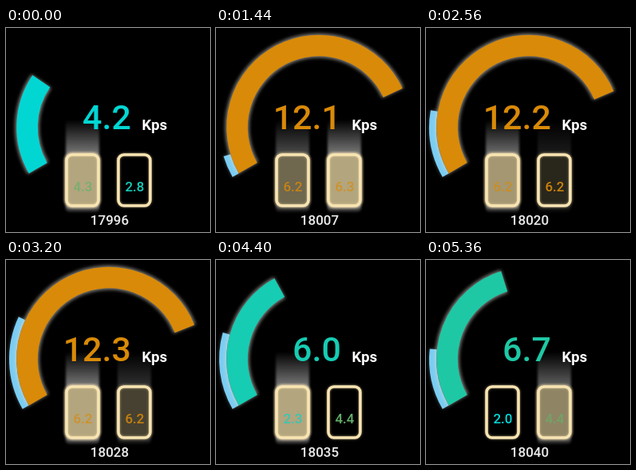
An HTML page that plays this animation: 256 px wide and 256 px high, repeating every 5440 ms.

```html
<!DOCTYPE html>
<html lang="en">
<head>
<meta charset="utf-8">
<title>Key rate gauge</title>
<style>
  html, body { margin: 0; width: 100%; height: 100%; overflow: hidden; background: #000; }
  svg { display: block; width: 100vw; height: 100vh; }
  text { font-family: Roboto, "Liberation Sans", sans-serif; font-weight: 500; }
</style>
</head>
<body>
<svg id="stage" viewBox="0 0 256 256">
  <defs>
    <linearGradient id="beam" x1="0" y1="0" x2="0" y2="1">
      <stop offset="0" stop-color="#fff" stop-opacity="0"/>
      <stop offset=".36" stop-color="#fff" stop-opacity=".45"/>
      <stop offset=".94" stop-color="#fff" stop-opacity=".45"/>
      <stop offset="1" stop-color="#fff" stop-opacity=".1"/>
    </linearGradient>
    <filter id="soft" x="-20%" y="-20%" width="140%" height="140%">
      <feGaussianBlur stdDeviation="1.5"/>
    </filter>
    <filter id="halo" filterUnits="userSpaceOnUse" x="0" y="0" width="256" height="256">
      <feGaussianBlur stdDeviation="2.2"/>
    </filter>
  </defs>
  <rect width="256" height="256"/>
  <g fill="none">
    <path id="trackGlow" stroke="#bcd" stroke-width="9" opacity=".4" filter="url(#halo)"/>
    <path id="track" stroke="#79cdf3" stroke-width="9"/>
    <path id="dialGlow" stroke="#dcd8d0" stroke-width="30" opacity=".6" filter="url(#halo)"/>
    <path id="dial" stroke-width="26.5"/>
  </g>
  <g id="keys"></g>
  <text id="speed" x="157" y="126.5" font-size="43" text-anchor="end"></text>
  <text x="170.5" y="127.5" font-size="18.5" style="font-weight: 700" fill="#fff">Kps</text>
  <text id="total" x="130" y="246.5" font-size="17" text-anchor="middle" fill="#ececec"></text>
</svg>
<script>
const LOOP = 5440, STEP = 80;
const CX = 129, CY = 124.5, START = 150, DEG_PER_KPS = 15.3;
const COUNT_BEFORE = 17995;
const HOLD = 60, FADE = 120;

const $ = id => document.getElementById(id);

// Key poses, eased into one another; L and R are the rates of the two keys
const poses = [
  { at: 0, speed: 4.2, track: 0, L: 4.3, R: 2.8 },
  { at: 880, speed: 3.5, track: 12.7, L: 2.2, R: 2.8 },
  { at: 1440, speed: 12.1, track: 13, L: 6.2, R: 6.3 },
  { at: 3360, speed: 12.3, track: 56, L: 6.2, R: 6.2 },
  { at: 3920, speed: 5, track: 58, L: 2.8, R: 4.3 },
  { at: 4800, speed: 6.7, track: 36, L: 2, R: 4.4 }
];

// Evenly spaced presses, one per letter
const run = (start, gap, pattern) => [...pattern].map((side, i) => ({ side, at: start + gap * i }));
const presses = [
  ...run(0, 263, "LRLR"),
  ...run(840, 82.5, "LR".repeat(15)),
  ...run(3480, 200, "RLR"),
  ...run(4060, 150, "LRLRR"),
  ...run(4980, 148, "LRR")
];

const clamp = v => Math.max(0, Math.min(1, v));
const smooth = u => u * u * (3 - 2 * u);
const mix = (a, b, u) => a + (b - a) * u;

function valueAt(name, t) {
  const next = poses.findIndex(p => p.at > t);
  if (next < 0) return poses[poses.length - 1][name];
  const a = poses[next - 1], b = poses[next];
  return mix(a[name], b[name], smooth((t - a.at) / (b.at - a.at)));
}

// Cyan when slow, through green, to orange when fast
const CYAN = [0, 215, 215], GREEN = [30, 200, 165], ORANGE = [217, 138, 8];
function tone(speed) {
  const slow = clamp((speed - 4) / 2.7), fast = clamp((speed - 6.7) / 5.3);
  const rgb = CYAN.map((c, i) => Math.round(mix(mix(c, GREEN[i], slow), ORANGE[i], fast)));
  return `rgb(${rgb})`;
}

function arc(radius, sweep) {
  if (sweep < 0.1) return "";
  const point = deg => {
    const a = deg * Math.PI / 180;
    return `${CX + radius * Math.cos(a)} ${CY + radius * Math.sin(a)}`;
  };
  return `M${point(START)}A${radius} ${radius} 0 ${sweep > 180 ? 1 : 0} 1 ${point(START + sweep)}`;
}

function buildKey(side, x) {
  const g = document.createElementNS("http://www.w3.org/2000/svg", "g");
  const box = `x="${x + 2}" y="159" width="40" height="64" rx="7"`;
  g.innerHTML = `
    <g class="lit">
      <rect x="${x + 1}" y="115" width="42" height="116" rx="5" fill="url(#beam)" filter="url(#soft)"/>
      <rect ${box} fill="none" stroke="#ffe9bc" stroke-width="6" opacity=".6" filter="url(#soft)"/>
    </g>
    <rect ${box} fill="#000"/>
    <rect class="lit" ${box} fill="#b3a57d"/>
    <rect ${box} fill="none" stroke="#f8e6b0" stroke-width="4" opacity=".5" filter="url(#soft)"/>
    <rect ${box} fill="none" stroke="#f8e4b2" stroke-width="3.6"/>
    <text x="${x + 22.5}" y="205" font-size="17" text-anchor="middle"></text>`;
  $("keys").append(g);
  return { side, lit: g.querySelectorAll(".lit"), label: g.querySelector("text") };
}

const keys = [buildKey("L", 74), buildKey("R", 139)];

function draw(t) {
  const speed = valueAt("speed", t);
  const paths = {
    dial: arc(102.5, speed * DEG_PER_KPS),
    track: arc(120.5, valueAt("track", t))
  };
  for (const [id, d] of Object.entries(paths)) {
    $(id).setAttribute("d", d);
    $(id + "Glow").setAttribute("d", d);
  }
  $("dial").setAttribute("stroke", tone(speed));
  $("speed").setAttribute("fill", tone(speed));
  $("speed").textContent = speed.toFixed(1);

  const done = presses.filter(p => p.at <= t);
  $("total").textContent = COUNT_BEFORE + done.length;

  for (const { side, lit, label } of keys) {
    const last = done.filter(p => p.side === side).pop();
    const level = last ? clamp(1 - (t - last.at - HOLD) / FADE) : 0;
    const rate = valueAt(side, t);
    lit.forEach(el => el.setAttribute("opacity", level));
    label.textContent = rate.toFixed(1);
    label.setAttribute("fill", tone(rate * 2));
    label.setAttribute("opacity", 1 - 0.3 * level);
  }
}

function tick() {
  const t = performance.now() % LOOP;
  draw(Math.floor(t / STEP) * STEP);
  requestAnimationFrame(tick);
}

tick();
</script>
</body>
</html>
```
